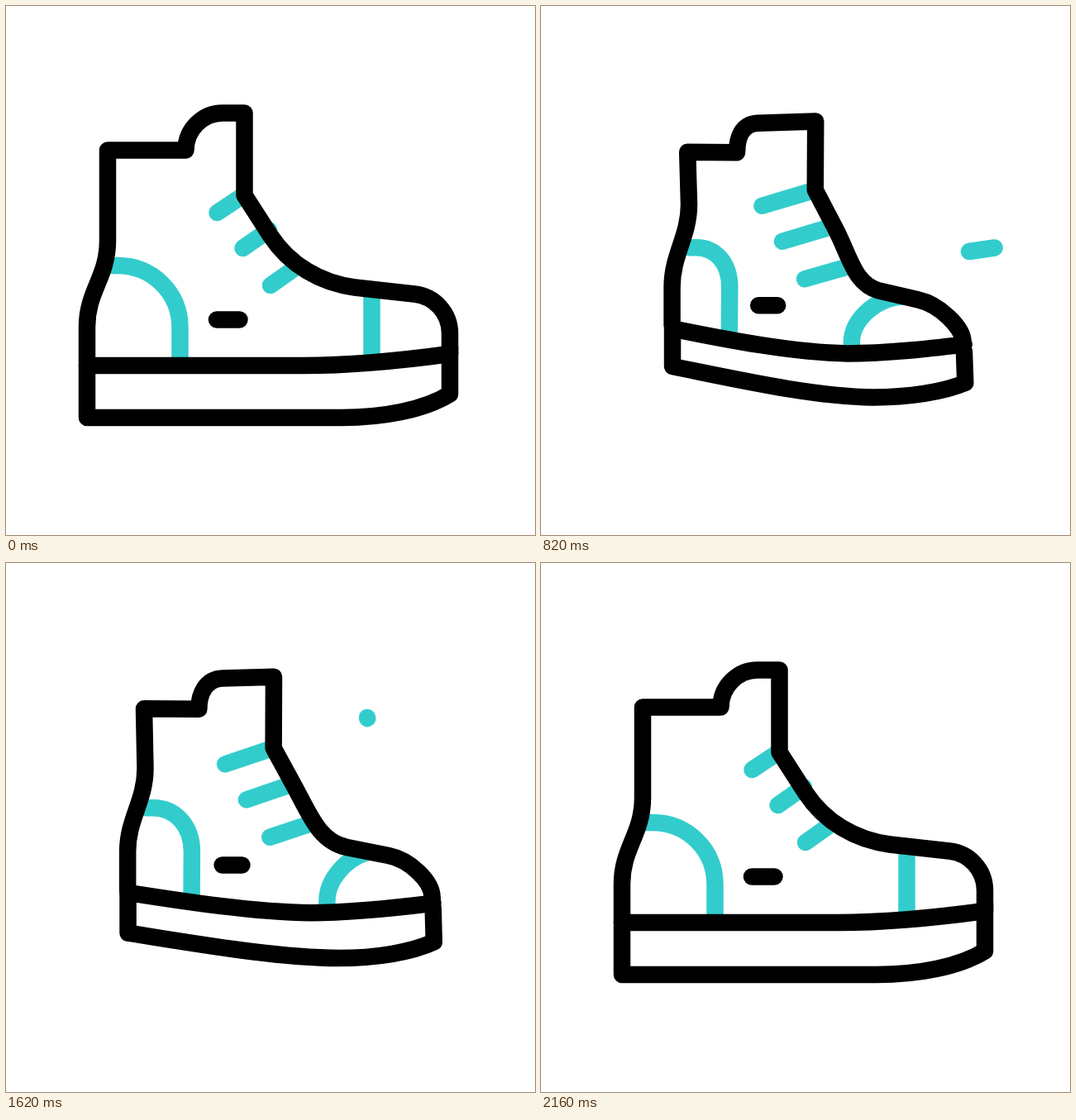
Write an HTML page with a canvas that moves like this. It is 640 by 640 pixels and loops after 2.4 s.

```html
<!DOCTYPE html>
<html lang="en">
<head>
<meta charset="utf-8">
<title>Sneaker</title>
<style>
html, body { margin: 0; width: 100%; height: 100%; overflow: hidden; background: #fff; }
canvas { display: block; width: 100vmin; height: 100vmin; }
</style>
</head>
<body>
<canvas id="stage"></canvas>
<script>
const canvas = document.getElementById("stage");
const ctx = canvas.getContext("2d");
const LOOP = 2400, MOVE = 2160, STEP = 20;
const TEAL = "#33cccc", BLACK = "#000";

// Each part has a resting and a bent pose with matching commands.
const parts = [
  // laces
  [TEAL, "M255.5 250 L288 228.5", "M268.5 241 L336 222"],
  [TEAL, "M286.5 293 L318 271", "M292.5 284 L357 266"],
  [TEAL, "M320 338 L351 316", "M319 329.5 L378 314"],
  // heel patch
  [TEAL, "M125 314 L135 314 C177 314 210.5 347 210.5 389 L210.5 434",
         "M185 290 L193 290 C215 290 230 308 230 335 L229.5 397"],
  // toe cap
  [TEAL, "M442.5 343 C442.5 371 442.5 400 442.5 428",
         "M436 352 C400 353 364 380 370 413"],
  // upper
  [BLACK,
    "M98 435 L98 388 C98 345 123 328 123 284 L123 174.5 L217.5 174.5 " +
    "C217.5 150 237.5 129.5 262 129.5 L288.5 129.5 L288.5 229 L320 278 " +
    "C343 313 380 335 422 340.5 L494 348.5 C518 351 537 371 537 396 L537 421",
    "M164.5 382 L164.5 335 C164.5 297 184.5 274 184.5 236 L182.5 177 L239 177.5 " +
    "C239 161 243 144 262 143 L336.5 140.5 L336 222 L361 271 " +
    "C378 306 380 337 408 345 L452 356 C478 362 508 390 508 407 L509 408.5"],
  // sole
  [BLACK, "M98 435 C185 435 273 435 360 435 C419 435 478 429 537 421",
          "M165 386 C230 401 310 418 372 419 C420 419 470 413 509 408.5"],
  [BLACK, "M98 435 L98 498 C200 498 304 498 406 498 C456 498 505 489 537 469.5 L537 412",
          "M165 386 L165 430 C240 447 330 470 402 471 C443 471 485 465 511 454.5 L509.5 418"],
  // vent
  [BLACK, "M255 379.5 L282.5 379.5", "M264 360.5 L286.5 360.5"]
].map(([color, rest, bent]) => ({ color, rest: parse(rest), bent: parse(bent) }));

// inner point, outer point, start time
const sparks = [
  [518, 297, 579.5, 288, 670],
  [492, 266, 528, 214, 870],
  [451, 248, 437, 187, 1070]
];
const SPARK = 300;

function parse(text) {
  return text.match(/[MLC][^MLC]*/g).map(s => [s[0], s.slice(1).trim().split(/\s+/).map(Number)]);
}

function mix(a, b, k) { return a + (b - a) * k; }

// cubic-bezier(.8, 0, .2, 1)
function ease(x) {
  if (x <= 0) return 0;
  if (x >= 1) return 1;
  let lo = 0, hi = 1;
  for (let i = 0; i < 24; i++) {
    const s = (lo + hi) / 2, r = 1 - s;
    if (2.4 * s * r * r + 0.6 * s * s * r + s * s * s < x) lo = s;
    else hi = s;
  }
  return lo * lo * (3 - 2 * lo);
}

function drawPart(part, k) {
  ctx.beginPath();
  part.rest.forEach(([cmd, nums], i) => {
    const p = nums.map((n, j) => mix(n, part.bent[i][1][j], k));
    if (cmd === "M") ctx.moveTo(...p);
    else if (cmd === "L") ctx.lineTo(...p);
    else ctx.bezierCurveTo(...p);
  });
  ctx.strokeStyle = part.color;
  ctx.stroke();
}

function drawSpark([x0, y0, x1, y1, start], t) {
  if (t <= start || t >= start + 2 * SPARK) return;
  const head = ease((t - start) / SPARK);
  const tail = ease((t - start - SPARK) / SPARK);
  ctx.beginPath();
  ctx.moveTo(mix(x0, x1, tail), mix(y0, y1, tail));
  ctx.lineTo(mix(x0, x1, head), mix(y0, y1, head));
  ctx.strokeStyle = TEAL;
  ctx.stroke();
}

function draw(t) {
  const size = Math.round(canvas.clientWidth * (window.devicePixelRatio || 1));
  if (canvas.width !== size) canvas.width = canvas.height = size;
  ctx.setTransform(size / 640, 0, 0, size / 640, 0, 0);
  ctx.fillStyle = "#fff";
  ctx.fillRect(0, 0, 640, 640);
  ctx.lineWidth = 20.5;
  ctx.lineCap = ctx.lineJoin = "round";
  const bend = t < 1200 ? ease(t / 1200) : 1 - ease((t - 1200) / (MOVE - 1200));
  parts.forEach(p => drawPart(p, bend));
  sparks.forEach(s => drawSpark(s, t));
}

const begin = performance.now();
function tick() {
  const t = (performance.now() - begin) % LOOP;
  draw(Math.min(MOVE, Math.floor(t / STEP) * STEP));
  requestAnimationFrame(tick);
}
tick();
</script>
</body>
</html>
```
